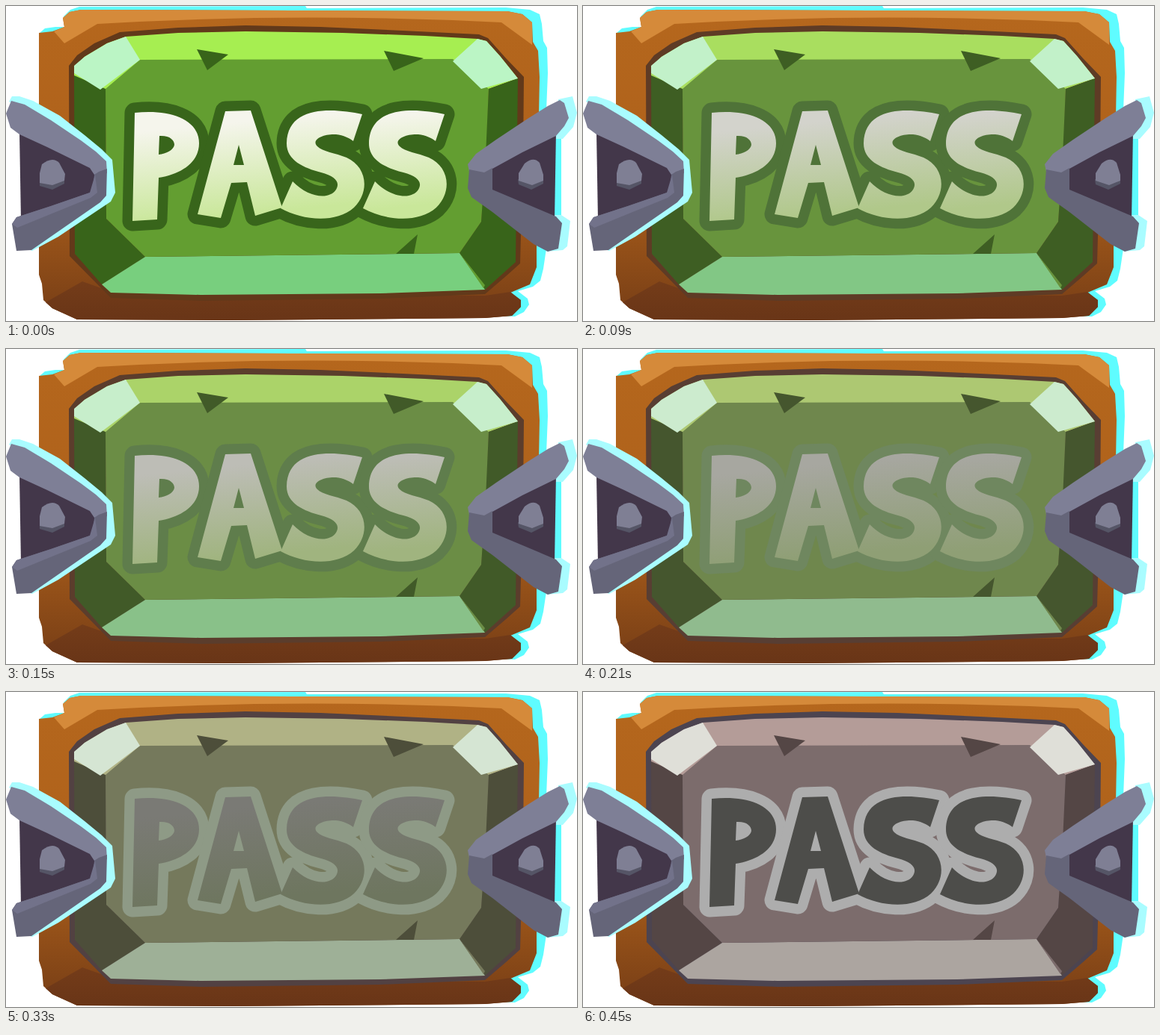
These frames come from a looping animation (763x422 px, 1.92 s). An HTML page:

```html
<!DOCTYPE html>
<html lang="en">
<head>
<meta charset="utf-8">
<title>Pass button</title>
<style>
  html, body { margin: 0; width: 100%; height: 100%; overflow: hidden; background: #fff; }
  svg { display: block; width: 100vw; height: 100vh; }
  .rim { fill: var(--rim); }
  .face { fill: var(--face); }
  .shade { fill: var(--shade); }
  .top { fill: var(--top); }
  .bottom { fill: var(--bottom); }
  .corner { fill: var(--corner); }
  .edge { fill: none; stroke: var(--edge); stroke-width: 27; stroke-linejoin: round; }
  .cyan { fill: #5ffcff; }
  .ice { fill: #a9fcff; }
  .steel { fill: #7e7f96; }
  .iron { fill: #656579; }
  .pit { fill: #43374a; }
  .bolt { fill: #7f7f94; }
  .boltShade { fill: #555566; }
</style>
</head>
<body>
<svg viewBox="0 0 763 422" preserveAspectRatio="none" role="img" aria-label="PASS">
  <defs>
    <linearGradient id="wood" x1="0" y1="0" x2="0" y2="1">
      <stop offset="0" stop-color="#b5671d"/>
      <stop offset=".55" stop-color="#ae611b"/>
      <stop offset="1" stop-color="#763d16"/>
    </linearGradient>
    <linearGradient id="base" x1="0" y1="0" x2="0" y2="1">
      <stop offset="0" stop-color="#743c19"/>
      <stop offset="1" stop-color="#693517"/>
    </linearGradient>
    <linearGradient id="ink" gradientUnits="userSpaceOnUse" x1="215" y1="165" x2="227" y2="288">
      <stop offset="0" style="stop-color:var(--inkTop)"/>
      <stop offset="1" style="stop-color:var(--inkLow)"/>
    </linearGradient>
    <path id="s" d="M476 145C438 137 376 132 375 184C375 207 398 217 421 223C440 228 447 236 441 246C432 260 404 257 383 235L367 271C396 287 440 292 465 270C487 248 482 215 455 203C440 197 423 195 416 188C407 179 424 171 441 172C451 173 459 177 464 181Z"/>
    <g id="word" fill-rule="evenodd">
      <path d="M172 143C216 138 258 150 258 184C258 209 235 225 204 230L202 286L169 288ZM205 174C218 173 225 179 225 186C224 193 214 198 204 199Z"/>
      <path d="M293 141L327 140L369 270L333 281L322 236L301 237L287 284L256 279ZM311 186L304 213L318 213Z"/>
      <use href="#s"/>
      <use href="#s" x="110"/>
    </g>
  </defs>

  <path class="cyan" d="M45 36L52 30L66 28L78 28L77 14L86 5L98 1L400 0L402 3L668 2L700 5L713 11L716 24L718 47L723 56L724 90L722 140L742 170L742 285L722 325L718 352L714 368L704 376L684 382L697 392L699 400L692 410L680 416L640 414L650 40Z"/>
  <path fill="url(#wood)" d="M44 36L62 34L78 28L76 16L85 8L100 5L670 7L690 11L703 22L704 48L711 60L713 95L709 310L709 350L700 373L674 384L688 394L688 403L676 415L640 418L300 421L95 420L62 405L50 394L48 372L44 360Z"/>
  <path fill="#d58a3a" d="M78 50L64 34L78 28L76 16L85 8L100 5L670 7L690 11L703 22L703 52L662 22Q390 8 122 24Z"/>
  <path fill="url(#base)" d="M53 397L102 369L150 386L640 388L674 383L688 394L688 403L676 415L640 418L300 421L95 420L62 405Z"/>

  <path class="rim" d="M84 80L95 66L118 50L152 35L230 29L320 26L420 28L530 33L632 38L644 43L668 70L692 95L691 200L687 345L668 362L640 386L500 392L260 395L140 391L85 335Z"/>
  <path class="top" d="M91 83L105 68L135 50L160 41L230 36L320 34L450 36L560 40L630 44L642 47L660 67L684 97L645 111L133 112L91 95Z"/>
  <path class="shade" d="M91 93L133 111L134 285L186 336L128 373L92 332ZM684 97L645 111L635 289L606 331L640 380L681 343Z"/>
  <path class="bottom" d="M186 336L606 331L640 380L500 385L260 387L140 384L128 373Z"/>
  <path class="face" d="M133 111L179 72L597 71L645 111L641 200L635 289L606 331L186 336L134 285ZM606 331L640 374L638 378Z"/>
  <path class="corner" d="M91 80L105 68L135 50L160 41L179 72L126 112L91 90ZM630 44L642 47L660 67L684 97L635 111L597 74Z"/>
  <path class="shade" d="M255 58L297 65L269 86ZM505 60L558 70L518 87ZM550 306L545 332L521 332Z"/>

  <use class="edge" href="#word"/>
  <path fill="var(--edge)" d="M203 172H228V203H202ZM311 182L301 215H322Z"/>
  <use fill="url(#ink)" href="#word"/>

  <g>
    <path class="ice" d="M4 128L8 121L18 121L36 127L72 147L105 173L128 192L142 206L146 250L140 262L70 309L35 328L24 324L100 255L100 190Z"/>
    <path class="pit" d="M18 170L119 214L120 250L20 287Z"/>
    <path class="steel" d="M0 144L7 127L25 132L60 153L100 180L120 195L134 208L135 224L118 226L112 217L55 189L18 172L6 163Z"/>
    <path class="iron" d="M118 226L124 222L135 218L134 254L126 263L34 327L14 328L8 292L14 283L60 268L112 250L116 245Z"/>
    <path fill="#72728a" d="M8 292L14 283L60 268L112 250L119 226L122 250L113 257L15 297Z"/>
    <path class="boltShade" d="M45 235L62 238L78 230V238L62 246L45 241Z"/>
    <path class="bolt" d="M48 212Q62 201 71 210L79 225L78 234L62 240L45 237V224Z"/>
  </g>
  <g>
    <path class="ice" d="M738 125L757 121L763 143L758 162L744 178H732ZM733 280L742 280L754 288L750 322L744 327L722 329Z"/>
    <path class="pit" d="M642 214L735 168L733 287L642 250Z"/>
    <path class="steel" d="M617 212L628 198L655 179L697 151L724 134L740 126L746 130L752 150L746 161L735 174L690 196L650 218L638 225L619 222Z"/>
    <path class="iron" d="M619 219L639 223L650 217V246L735 282L743 291L738 325L724 329L705 319L650 276L622 256L617 244Z"/>
    <path class="boltShade" d="M684 232L702 238L718 232V238L702 246L685 239Z"/>
    <path class="bolt" d="M685 224L693 211Q705 201 713 210L718 226V234L703 240L685 234Z"/>
  </g>
</svg>
<script>
  const LOOP = 1920, STEP = 30, STEPS = 15;
  // Each colour fades from lively to stone.
  const fades = {
    rim: ["#62391a", "#4c4450"],
    face: ["#639e31", "#7c6c6c"],
    shade: ["#38641a", "#544645"],
    top: ["#a6ee51", "#b49c98"],
    bottom: ["#78cf7e", "#aca5a0"],
    corner: ["#bbf5c5", "#dfdfd8"],
    edge: ["#38651b", "#adadad"],
    inkTop: ["#f5f5ec", "#4d4d4a"],
    inkLow: ["#c9e79a", "#4d4d4a"]
  };
  const channels = hex => [1, 3, 5].map(i => parseInt(hex.slice(i, i + 2), 16));
  const mix = (a, b, p) => {
    const end = channels(b);
    return `rgb(${channels(a).map((v, i) => Math.round(v + (end[i] - v) * p))})`;
  };
  const root = document.documentElement.style;
  const start = performance.now();

  function draw(now) {
    const t = Math.max(0, now - start) % LOOP;
    const p = Math.min(STEPS, Math.floor(t / STEP)) / STEPS;
    for (const name in fades) root.setProperty("--" + name, mix(...fades[name], p));
    requestAnimationFrame(draw);
  }
  draw(start);
</script>
</body>
</html>
```
